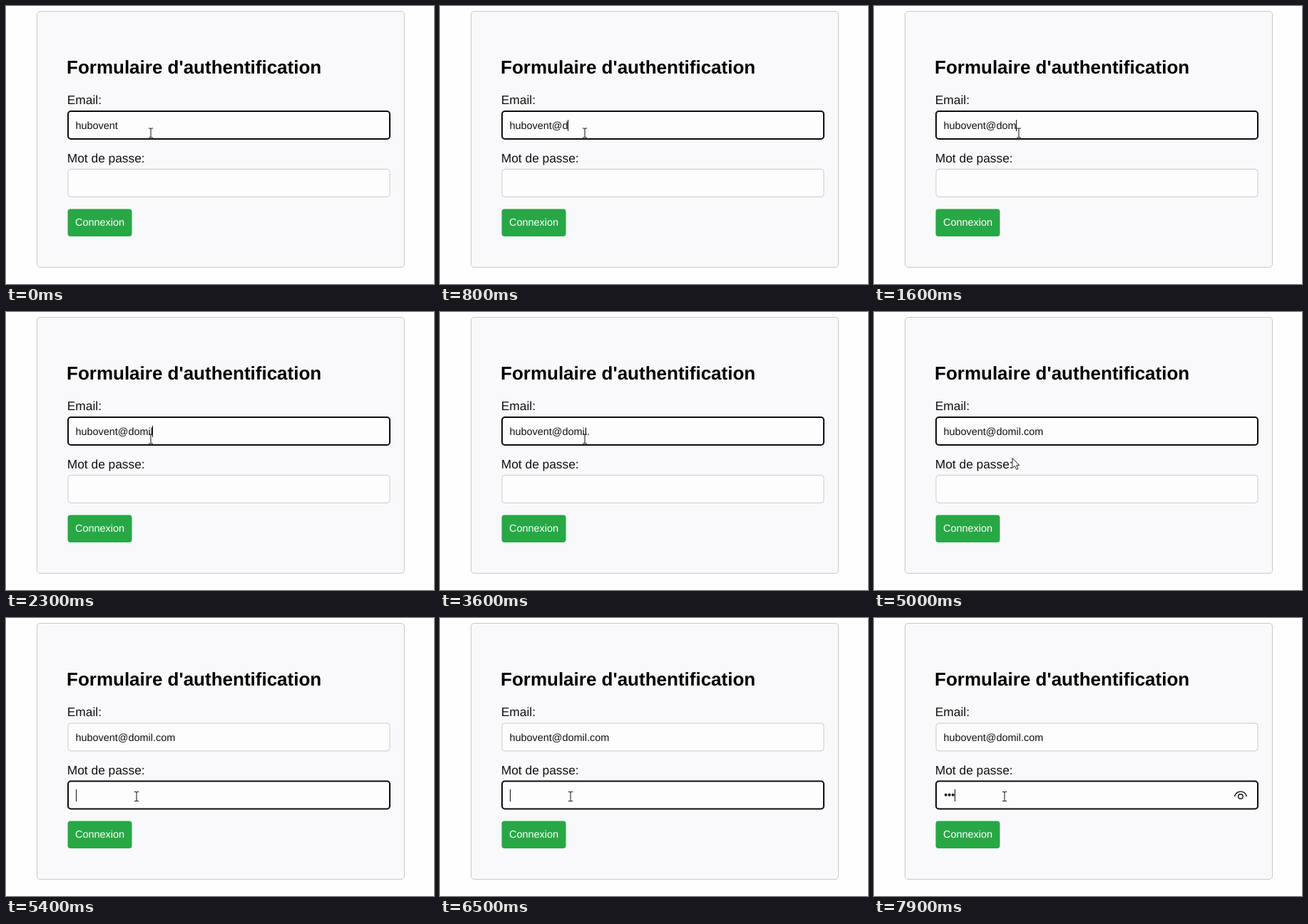
Write an HTML page that moves like this. It is 600 by 391 pixels and loops after 8000 ms.

```html
<!DOCTYPE html>
<html lang="fr">
<head>
<meta charset="utf-8">
<style>
html, body { margin: 0; width: 100%; height: 100%; overflow: hidden; background: #fefefe; }
svg { display: block; }
text { font-family: "Liberation Sans", Arial, sans-serif; font-size: 14.44px; fill: #111; text-rendering: geometricPrecision; white-space: pre; }
.label { font-size: 17.33px; }
.title { font-size: 26px; font-weight: bold; fill: #000; }
.field { fill: #fefdfe; stroke: #cac9cd; stroke-width: 1; }
.field.focus { stroke: #0c0c10; stroke-width: 2; }
.line { fill: none; stroke: #111; }
</style>
</head>
<body>
<svg width="600" height="391" viewBox="0 0 600 391">
  <rect x="43.5" y="7.5" width="515" height="360" rx="4.5" fill="#f9f8fb" stroke="#c9c8cc"/>
  <text class="title" x="85" y="95.3">Formulaire d'authentification</text>
  <text class="label" x="85.8" y="138">Email:</text>
  <rect id="emailBox" class="field" x="87" y="148" width="451" height="39" rx="4"/>
  <text id="email" x="97.4" y="172.6"></text>
  <text class="label" x="85.8" y="219.6">Mot de passe:</text>
  <rect id="passBox" class="field" x="87" y="229.5" width="451" height="39" rx="4"/>
  <g id="dots" fill="#111">
    <circle cx="100.7" cy="248.8" r="2"/>
    <circle cx="105.7" cy="248.8" r="2"/>
    <circle cx="110.7" cy="248.8" r="2"/>
  </g>
  <g id="eye" class="line" stroke-width="1.4">
    <path d="M505.5 251C508 241.8 520 241.8 522.3 251"/>
    <circle cx="513.9" cy="251" r="3.3"/>
  </g>
  <rect x="86.5" y="285.5" width="90" height="38.5" rx="4" fill="#28a745"/>
  <text x="97" y="309" style="fill:#fff">Connexion</text>
  <rect id="caret" width="1" fill="#111"/>
  <path id="beam" class="line" d="M-3-6.5H-1L0-6 1-6.5H3M0-6V6M-3 6.5H-1L0 6 1 6.5H3"/>
  <path id="arrow" d="M0 0V14L3.3 11 5.8 16 8 15 5.7 10.2H9.8Z" fill="#fff" stroke="#222" stroke-width="1"/>
</svg>
<script>
const $ = id => document.getElementById(id);
const address = "hubovent@domil.com";
const emailKeys = [400, 700, 1100, 1400, 1700, 2000, 3000, 3800, 4000, 4200];
const passKeys = [7400, 7600, 7800];
const focusTime = 5360, blink = 570;
// time, x, y of the mouse
const path = [[4700, 203, 178.5], [5000, 194, 205.5], [5300, 183, 251]];

const show = (el, on) => el.style.display = on ? "" : "none";
const typed = (keys, t) => keys.filter(k => k <= t);

function mouseAt(t) {
  if (t <= path[0][0]) return path[0].slice(1);
  for (let i = 1; i < path.length; i++) {
    const [t0, x0, y0] = path[i - 1], [t1, x1, y1] = path[i];
    if (t <= t1) {
      const p = (t - t0) / (t1 - t0);
      return [x0 + (x1 - x0) * p, y0 + (y1 - y0) * p];
    }
  }
  return path[path.length - 1].slice(1);
}

function draw(t) {
  const inPass = t >= focusTime;
  const letters = typed(emailKeys, t), dots = typed(passKeys, t);
  $("email").textContent = address.slice(0, 8 + letters.length);
  $("emailBox").classList.toggle("focus", !inPass);
  $("passBox").classList.toggle("focus", inPass);
  [...$("dots").children].forEach((dot, i) => show(dot, i < dots.length));
  show($("eye"), dots.length > 0);

  // the caret restarts its blink at each key press
  const last = inPass ? Math.max(focusTime, ...dots) : Math.max(-600, ...letters);
  const x = inPass ? 98.5 + 5 * dots.length : 97.4 + $("email").getComputedTextLength();
  const caret = $("caret");
  show(caret, (t - last) % (2 * blink) < blink);
  caret.setAttribute("x", Math.floor(x));
  caret.setAttribute("y", inPass ? 241 : 160);
  caret.setAttribute("height", inPass ? 17 : 16);

  const [mx, my] = mouseAt(t);
  const overField = my < 188 || my > 229;
  for (const id of ["beam", "arrow"]) $(id).setAttribute("transform", `translate(${mx} ${my})`);
  show($("beam"), overField);
  show($("arrow"), !overField);
}

const start = performance.now();
function tick() {
  draw(Math.floor((performance.now() - start) % 8000 / 100) * 100);
  requestAnimationFrame(tick);
}
tick();
</script>
</body>
</html>
```
